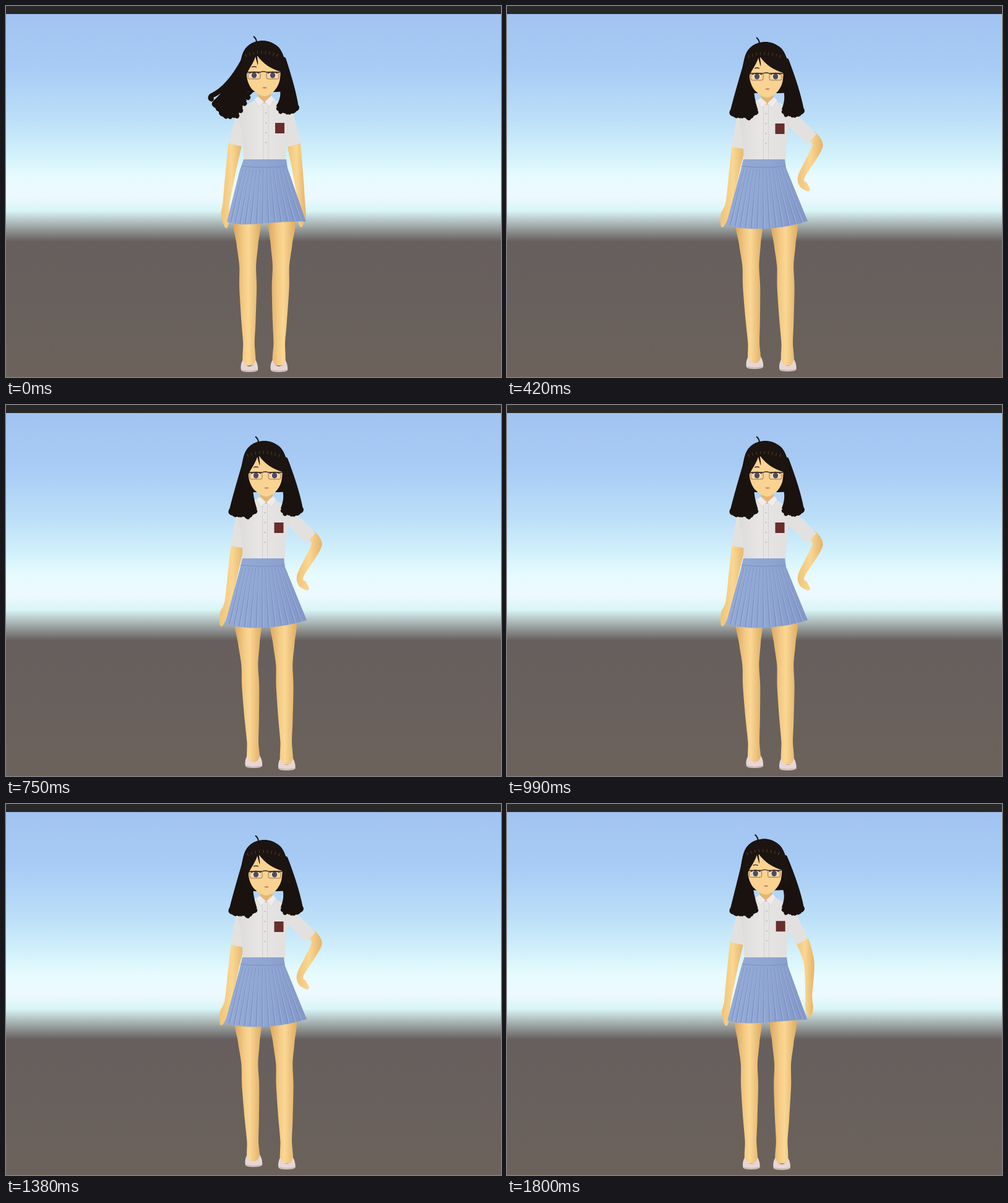
Write an HTML page that moves like this. It is 800 px wide and 600 px high and loops after 1.83 s.

```html
<!DOCTYPE html>
<html lang="en">
<head>
<meta charset="utf-8">
<title>Standing pose</title>
<style>
html, body { margin: 0; width: 100%; height: 100%; overflow: hidden; background: #282828; }
svg { display: block; width: 100vw; height: 100vh; }
</style>
</head>
<body>
<svg viewBox="0 0 800 600" preserveAspectRatio="none">
  <defs>
    <linearGradient id="worldFill" gradientUnits="userSpaceOnUse" x1="0" y1="0" x2="0" y2="600">
      <stop offset=".02" stop-color="#a2c3f1"/><stop offset=".17" stop-color="#a8ccf5"/>
      <stop offset=".3" stop-color="#bbdef8"/><stop offset=".4" stop-color="#d2f1fb"/>
      <stop offset=".46" stop-color="#e7fbfe"/><stop offset=".515" stop-color="#edf9ff"/>
      <stop offset=".552" stop-color="#d9f5f6"/><stop offset=".595" stop-color="#9fa7a7"/>
      <stop offset=".635" stop-color="#665f5e"/><stop offset="1" stop-color="#6c625b"/>
    </linearGradient>
    <linearGradient id="legFill">
      <stop offset="0" stop-color="#dba75f"/><stop offset=".35" stop-color="#f4ca84"/>
      <stop offset=".55" stop-color="#fad794"/><stop offset="1" stop-color="#deac63"/>
    </linearGradient>
    <linearGradient id="armFill">
      <stop offset="0" stop-color="#f0c379"/><stop offset=".5" stop-color="#fad791"/>
      <stop offset="1" stop-color="#e5b36a"/>
    </linearGradient>
    <linearGradient id="shirtFill">
      <stop offset="0" stop-color="#dddcdb"/><stop offset=".4" stop-color="#e8e6e5"/>
      <stop offset="1" stop-color="#e1dfde"/>
    </linearGradient>
    <linearGradient id="skirtFill">
      <stop offset="0" stop-color="#94aad6"/><stop offset=".5" stop-color="#8fa5d2"/>
      <stop offset="1" stop-color="#8297c7"/>
    </linearGradient>
    <g id="shoe">
      <path d="M-13 14Q-15 5 -10-3Q-8 7 0 8Q9 7 10-3Q15 5 14 14Q12 17 0 17Q-12 17 -13 14Z" fill="#e7d6d5"/>
      <path d="M-12 14Q0 17 13 14" fill="none" stroke="#c9b3b1" stroke-width="1.5"/>
    </g>
    <g id="eye">
      <ellipse rx="6.500" ry="4.500" fill="#eee2da"/>
      <ellipse rx="4.200" ry="4.700" fill="#4f4c5c"/>
      <path d="M-8-3Q0-8 8-3" fill="none" stroke="#30211e" stroke-width="1.4"/>
      <rect x="-10" y="-5" width="20" height="11" rx="2.500" fill="none" stroke="#85574c" stroke-width=".8"/>
    </g>
  </defs>

  <rect width="800" height="600" fill="url(#worldFill)"/>
  <rect width="800" height="13" fill="#282828"/>

  <path id="legL" fill="url(#legFill)"/>
  <path id="legR" fill="url(#legFill)"/>
  <use id="shoeL" href="#shoe"/>
  <use id="shoeR" href="#shoe"/>
  <path id="armL" fill="url(#armFill)"/>
  <path id="armR" fill="url(#armFill)"/>
  <path id="sleeveL" fill="#e3e1e0"/>
  <path id="sleeveR" fill="#e3e1e0"/>
  <g id="torso" fill="none">
    <path d="M407 150L382 163Q376 170 378 190Q384 215 384 251H452Q452 215 460 185Q461 168 455 163L432 150Z" fill="url(#shirtFill)"/>
    <path d="M416 160V249M424 160V249" stroke="#d3d1cf"/>
    <path d="M420 172v50" stroke="#bfbcba" stroke-width="2" stroke-dasharray="2 14"/>
    <rect x="435" y="189" width="15" height="17" fill="#672e2b"/>
  </g>
  <path id="skirt" fill="url(#skirtFill)"/>
  <path id="pleatDark" fill="none" stroke="#7a8fc0" stroke-width="1.2"/>
  <path id="pleatLight" fill="none" stroke="#a0b3dd"/>

  <g fill="none" stroke="#1a120f" stroke-linecap="round">
    <path id="lockL" stroke-width="8"/>
    <path id="lockR" stroke-width="7"/>
  </g>

  <g id="head">
    <path d="M408 61Q408 55 403 51" fill="none" stroke="#1a120f" stroke-width="2"/>
    <path d="M415 58C432 57 447 67 452 85C457 100 460 120 462 140L440 141H402L378 140C378 120 380 95 385 80C390 66 401 59 415 58Z" fill="#1a120f"/>
    <path d="M410 138H432L430 153L420 160L411 153Z" fill="#e5b673"/>
    <path d="M410 148L420 157L412 165L404 153ZM432 147L421 157L429 165L437 153Z" fill="#eeecec" stroke="#d3d0ce" stroke-width=".7"/>
    <path d="M391 100C391 116 393 127 400 136C407 143 414 148 421 148C430 147 441 138 445 124C447 114 447 105 446 98L440 85L400 82Z" fill="#f8d391"/>
    <use href="#eye" x="404" y="114"/>
    <use href="#eye" x="434" y="114"/>
    <path d="M391 109H414Q419 107 424 109H448M400 101Q404 99 408 101" fill="none" stroke="#3b2925" stroke-width="1.3"/>
    <path d="M417 134Q421 132 425 134Q421 137 417 134Z" fill="#d77a69"/>
    <path d="M384 118C382 95 386 76 393 68C402 58 430 56 443 68C454 80 455 98 460 128L450 128C449 118 449 110 446 108C432 104 418 95 409 82C409 88 411 93 410 98L406 84C403 95 396 102 392 112L391 124Z" fill="#1c1411"/>
    <path d="M390 82Q416 71 444 83" fill="none" stroke="#4b3a2a" stroke-width="5" stroke-dasharray="1.500 5" opacity=".8"/>
  </g>
</svg>
<script>
const LOOP = 1830, STEP = 30;
const $ = id => document.getElementById(id);
const setPath = (id, d) => $(id).setAttribute("d", d);
const move = (id, x, y) => $(id).setAttribute("transform", `translate(${x} ${y})`);

const clamp = k => Math.max(0, Math.min(1, k));
const ease = k => k * k * (3 - 2 * k);
const mix = (a, b, k) => a + (b - a) * k;
const mixPoint = (p, q, k) => p.map((v, i) => mix(v, q[i], k));
const arch = u => Math.sin(Math.PI * u);
const random = seed => { const s = Math.sin(seed * 127.1) * 43758.5; return s - Math.floor(s); };

// Closed smooth curve through all points.
function smooth(points, pull) {
  const n = points.length, at = i => points[(i + n) % n];
  const handle = (i, sign) => [0, 1].map(c => at(i)[c] + sign * pull * (at(i + 1)[c] - at(i - 1)[c]));
  return "M" + points[0] + points.map((_, i) =>
    `C${handle(i, 1)} ${handle(i + 1, -1)} ${at(i + 1)}`).join("") + "Z";
}

// Outline of a limb that runs through joints, with half its width at each.
function tube(joints, widths, pull = 1 / 7) {
  const side = sign => joints.map(([x, y], i) => {
    const a = joints[Math.max(0, i - 1)], b = joints[Math.min(joints.length - 1, i + 1)];
    const dx = b[0] - a[0], dy = b[1] - a[1], r = sign * widths[i] / Math.hypot(dx, dy);
    return [x - dy * r, y + dx * r];
  });
  return smooth([...side(1), ...side(-1).reverse()], pull);
}

const legHeights = [345, 385, 420, 455, 510, 545, 578], legWidths = [20, 17.5, 13.5, 14, 11.5, 9.3, 9.5];
const armWidths = [9.5, 8.5, 5.5, 6.5, 2.5];

// Joints with the arms down and with the hand on the hip: shoulder, elbow, wrist, palm, fingertips.
const arms = {
  L: [[[372, 215], [364, 262], [356, 318], [354, 338], [356, 357]],
      [[376, 220], [368, 264], [359, 318], [352, 338], [348, 356]]],
  R: [[[464, 215], [471, 264], [478, 320], [478, 340], [477, 356]],
      [[488, 208], [502, 226], [476, 275], [479, 289], [488, 298]]]
};

function drawLeg(side, hip, foot, shoeY) {
  const joints = legHeights.map(y => [mix(hip, foot, (y - 345) / 233), y]);
  setPath("leg" + side, tube(joints, legWidths));
  move("shoe" + side, foot, shoeY);
}

function drawArm(side, k, swing) {
  const [down, raised] = arms[side];
  const joints = down.map((p, i) => {
    const [x, y] = mixPoint(p, raised[i], k);
    return [x + swing * (i ? 1 : .5), y];
  });
  setPath("arm" + side, tube(joints, armWidths));
}

function drawSleeve(side, top, cuff, width) {
  setPath("sleeve" + side, tube([top, cuff], [width, width], .02));
}

function drawSkirt(k) {
  const waist = [384 - 2 * k, 453 - 4 * k];
  const hem = [[357 - 3 * k, 349 + 5 * k], [384, 360 + 4 * k], [440, 346 + 17 * k], [485 + k, 349 - k]];
  setPath("skirt", `M${waist[0]} 248H${waist[1]}L${waist[1] + 2} 262L${hem[3]}C${hem[2]} ${hem[1]} ${hem[0]}L378 265Z`);
  const bezier = u => [0, 1].map(c => {
    const v = 1 - u;
    return v ** 3 * hem[0][c] + 3 * v * v * u * hem[1][c] + 3 * v * u * u * hem[2][c] + u ** 3 * hem[3][c];
  });
  let dark = `M${waist[0] - 3} 259Q418 263 ${waist[1] + 1} 259`, light = "";
  for (let i = 1; i < 14; i++) {
    const [x, y] = bezier(i / 14), top = mix(378, waist[1] + 2, i / 14);
    const pleat = d => `M${top + d / 3} 264Q${mix(top, x, .42)} 300 ${x + d} ${y - 1}`;
    dark += pleat(0);
    light += pleat(2.5);
  }
  setPath("pleatDark", dark);
  setPath("pleatLight", light);
}

// A lock is a fan of curly strands; shape(u) gives root, bend and tip from outer to inner.
function drawLock(side, count, shape, curl) {
  let d = "";
  for (let i = 0; i < count; i++) {
    const [root, bend, tip] = shape(i / (count - 1));
    tip[1] += 7 * random(i + 3) - 4;
    d += `M${root}Q${bend} ${tip}q${-curl} 3 ${curl * (random(i + 9) - .3)} 5`;
  }
  setPath("lock" + side, d);
}

function drawHair(wind, x, y) {
  const droop = 24 * arch(wind);
  drawLock("L", 11, u => [
    [388 + 6 * u + x, 88 + 35 * u + y],
    [mix(373, 360, wind) + 22 * u, mix(138, 133, wind) + 12 * u],
    mixPoint([365 + 36 * u, 168 + 6 * arch(u)], [332 + 58 * u, 144 + 32 * arch(u)], wind)
      .map((v, c) => c ? v + droop * (1 - u) : v)
  ], 3);
  drawLock("R", 9, u => [
    [452 - 5 * u + x, 88 + 40 * u + y],
    [470 - 14 * u - 5 * wind, 135 + 10 * u],
    [476 - 28 * u - 7 * wind, 165 + 8 * arch(u) - 5 * wind]
  ], -3);
}

function draw(t) {
  // 0 is arms down, 1 is hand on hip; the end of the loop is still on its way down.
  const k = ease(clamp(t / 200)) - .78 * ease(clamp((t - 1610) / 190));
  const wind = (1 - clamp(t / 420)) ** 2;
  const swing = 16 * arch(k), headX = 3 * (k - 1), headY = 2 * (k - 1);

  drawLeg("L", 389.5 + 1.5 * k, 393 + 7 * k, 575 - 5 * k);
  drawLeg("R", 446 + 2 * k, 441 + 12.5 * k, 575 - k);
  drawArm("L", k, 0);
  drawArm("R", k, swing);
  drawSleeve("L", [384, 172 + 2 * k], [371 + 3 * k, 224 + 5 * k], 11);
  drawSleeve("R", [452 + 3 * k, 172 + 6 * k], [466 + 26 * k + swing / 2, 224 - 9 * k], 11);
  move("torso", -1.5 * k, k);
  drawSkirt(k);
  drawHair(wind, headX, headY);
  move("head", headX, headY);
}

const start = performance.now();
function tick() {
  const t = (performance.now() - start) % LOOP;
  draw(Math.floor(t / STEP) * STEP);
  requestAnimationFrame(tick);
}
tick();
</script>
</body>
</html>
```
